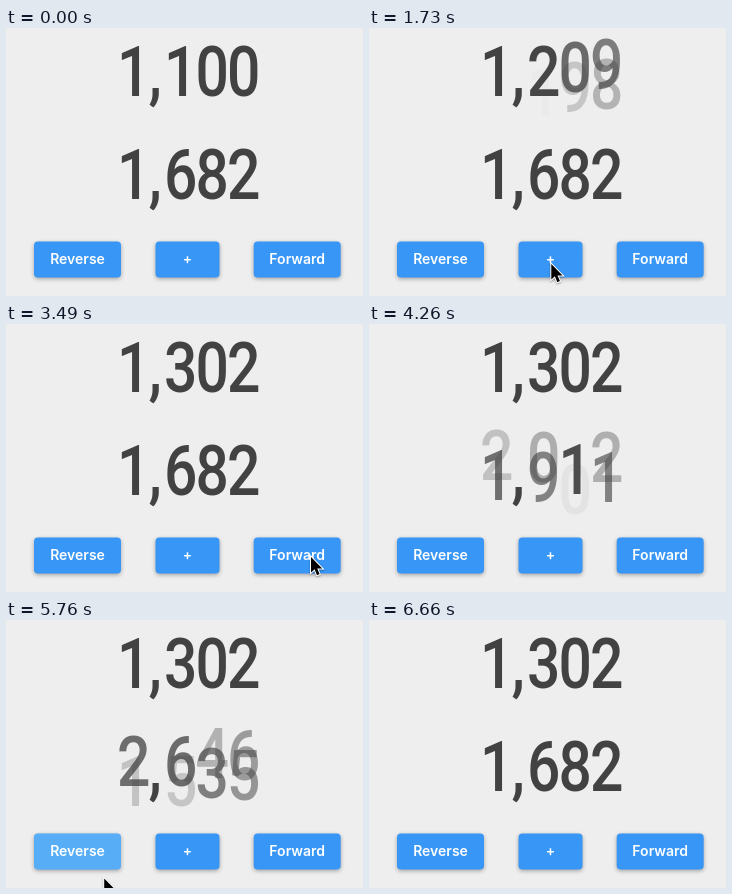
Recreate the animation shown at these times as an HTML page with a canvas. Size 357 px wide and 268 px high, loop 7.03 s.

```html
<!DOCTYPE html>
<html lang="en">
<head>
<meta charset="utf-8">
<title>Odometer</title>
<style>
  html, body { margin: 0; width: 100%; height: 100%; overflow: hidden; background: #eee; }
  canvas { display: block; }
</style>
</head>
<body>
<canvas id="stage" width="357" height="268"></canvas>
<script>
const ctx = document.getElementById('stage').getContext('2d');
const LOOP = 7030;
const ROLL = 20; // vertical travel of one digit step

const COLUMNS = [127.8, 174.6, 206.2, 237.8]; // thousands to units
const COMMA_X = 149.2;
const DIGIT_FONT = '450 condensed 70px Roboto, sans-serif';

const linear = x => x;

// cubic-bezier(.42, 0, 1, 1)
function easeIn(x) {
  let lo = 0, hi = 1;
  for (let i = 0; i < 30; i++) {
    const u = (lo + hi) / 2, v = 1 - u;
    if (1.26 * u * v * v + 3 * u * u * v + u * u * u < x) lo = u; else hi = u;
  }
  return 3 * lo * lo - 2 * lo ** 3;
}

const counters = [
  { baseline: 68.2, initial: 1100, runs: [
    { start: 754.2, length: 1000, from: 1100, to: 1201, ease: linear },
    { start: 2194.7, length: 1000, from: 1201, to: 1302, ease: linear },
  ] },
  { baseline: 170.8, initial: 1682, runs: [
    { start: 3763.7, length: 1115, from: 1682, to: 2952, ease: easeIn },
    { start: 5591.7, length: 1064.3, from: 2952, to: 1682, ease: x => 1 - easeIn(1 - x) },
  ] },
];

const buttons = [
  { label: 'Reverse', x: 28, width: 87, clicks: [5590] },
  { label: '+', x: 149.5, width: 64, clicks: [753, 2194] },
  { label: 'Forward', x: 247.7, width: 87, clicks: [3763] },
];

// Pointer moves: start time, end time, from, to, downward bow
const moves = [
  [350, 570, [267, 270], [182.3, 236], 0],
  [2100, 2160, [182.3, 236], [184, 238], 0],
  [2860, 3490, [184, 238], [305, 233], 24],
  [3900, 4200, [305, 233], [300, 272], 0],
  [5110, 5450, [296, 270], [72, 236], 0],
  [5640, 5850, [72, 236], [117.5, 275], 0],
];

const arrow = new Path2D('M0 0V15.6L3.6 12.3L6 18.2L8.6 17.1L6.2 11.4H11.2Z');
const clamp = x => Math.max(0, Math.min(1, x));
const mix = (a, b, t) => a + (b - a) * t;

function drawGlyph(text, x, y, alpha) {
  if (alpha <= 0) return;
  ctx.save();
  ctx.globalAlpha = alpha;
  ctx.translate(x, y);
  // condensed proportions even where only the normal width is installed
  ctx.scale(33.4 / ctx.measureText('0').width, 1);
  ctx.fillText(text, 0, 0);
  ctx.restore();
}

function drawCounter({ baseline, initial, runs }, time) {
  const run = runs.filter(r => time >= r.start).pop();
  const { from, to } = run || { from: initial, to: initial };
  const t = run ? run.ease(clamp((time - run.start) / run.length)) : 0;

  ctx.font = DIGIT_FONT;
  ctx.textAlign = 'center';
  ctx.textBaseline = 'alphabetic';
  ctx.fillStyle = '#424242';
  drawGlyph(',', COMMA_X, baseline, 1);
  COLUMNS.forEach((x, i) => {
    const unit = 10 ** (3 - i);
    const value = mix(Math.floor(from / unit), Math.floor(to / unit), t);
    const digit = Math.floor(value), progress = value - digit;
    drawGlyph(digit % 10, x, baseline + ROLL * progress, 1 - progress);
    drawGlyph((digit + 1) % 10, x, baseline + ROLL * (progress - 1), progress);
  });
}

function drawButton({ label, x, width, clicks }, time) {
  ctx.save();
  ctx.beginPath();
  ctx.roundRect(x, 213.4, width, 36, 4);
  ctx.shadowColor = 'rgba(0,0,0,.32)';
  ctx.shadowBlur = 4;
  ctx.shadowOffsetY = 1.5;
  ctx.fillStyle = '#3896f6';
  ctx.fill();
  ctx.shadowColor = 'transparent';
  for (const click of clicks) {
    const age = time - click;
    const glow = Math.min((age + 60) / 150 * 0.3, (390 - age) / 390 * 0.45);
    ctx.fillStyle = `rgba(180,242,248,${clamp(glow)})`;
    ctx.fill();
  }
  ctx.font = '600 14px Inter, sans-serif';
  ctx.textAlign = 'center';
  ctx.textBaseline = 'alphabetic';
  ctx.fillStyle = '#fff';
  ctx.fillText(label, x + width / 2, 236);
  ctx.restore();
}

function drawPointer(time) {
  const move = moves.filter(m => time >= m[0]).pop();
  if (!move) return;
  const [start, end, a, b, bow] = move;
  const t = clamp((time - start) / (end - start));
  ctx.save();
  ctx.translate(mix(a[0], b[0], t), mix(a[1], b[1], t) + bow * Math.sin(Math.PI * t));
  ctx.shadowColor = 'rgba(0,0,0,.35)';
  ctx.shadowBlur = 2;
  ctx.shadowOffsetY = 1;
  ctx.strokeStyle = '#fff';
  ctx.lineWidth = 2;
  ctx.stroke(arrow);
  ctx.shadowColor = 'transparent';
  ctx.fillStyle = '#000';
  ctx.fill(arrow);
  ctx.restore();
}

function render() {
  const time = performance.now() % LOOP;
  ctx.fillStyle = '#eee';
  ctx.fillRect(0, 0, 357, 268);
  counters.forEach(c => drawCounter(c, time));
  buttons.forEach(b => drawButton(b, time));
  drawPointer(time);
  requestAnimationFrame(render);
}
render();
</script>
</body>
</html>
```
